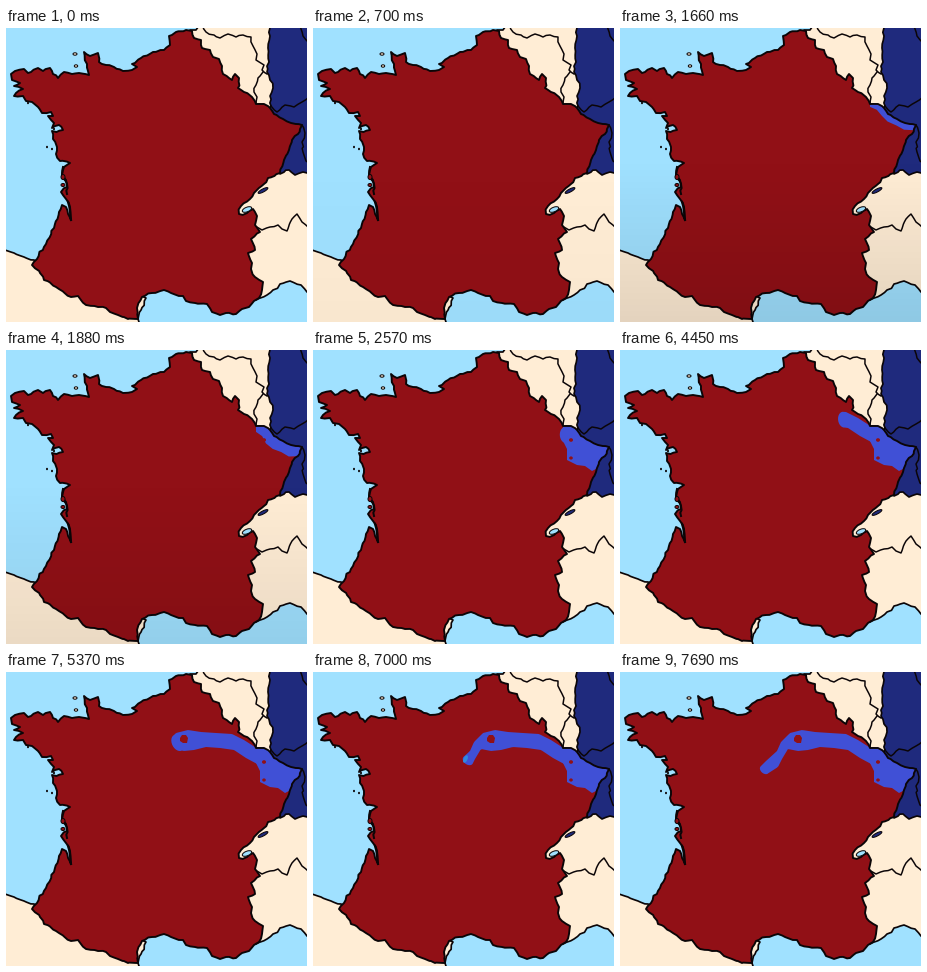
A matplotlib script for the animation above (8 s loop, 301x294 px).

```python
import numpy as np
import matplotlib.pyplot as plt
from matplotlib.animation import FuncAnimation
from matplotlib.patches import Polygon, Ellipse

W, H, DPI = 301, 294, 128
PX = 72 / DPI
STEP = 40
FRAMES = 200

SEA, LAND, RED = "#a0e1ff", "#ffedd5", "#911016"
NAVY, BLUE, INK = "#1f2a7d", "#4050d6", "#0b0507"

rng = np.random.default_rng(4)


def pts(text):
    return np.array([p.split(",") for p in text.split()], float)


def rough(p, amp=0.55, gap=3.2, closed=False):
    """Break a polyline into short, slightly irregular pieces."""
    p = np.vstack([p, p[:1]]) if closed else p
    out = []
    for a, b in zip(p[:-1], p[1:]):
        n = max(1, int(np.hypot(*(b - a)) / gap))
        seg = a + (b - a) * np.arange(n)[:, None] / n
        seg[1:] += rng.normal(0, amp, (n - 1, 2))
        out.append(seg)
    return np.vstack(out + [p[-1:]])


fig = plt.figure(figsize=(W / DPI, H / DPI), dpi=DPI, facecolor=SEA)
ax = fig.add_axes([0, 0, 1, 1])
ax.set_xlim(0, W)
ax.set_ylim(H, 0)
ax.axis("off")


def area(p, color, z, edge=INK, lw=1.7):
    patch = Polygon(p, closed=True, fc=color, ec=edge, lw=lw * PX,
                    zorder=z, joinstyle="round")
    ax.add_patch(patch)
    return patch


def line(text, lw=1.5, z=3, amp=0.55):
    p = rough(pts(text), amp)
    ax.plot(p[:, 0], p[:, 1], color=INK, lw=lw * PX, zorder=z,
            solid_joinstyle="round")


def dot(x, y, w, h, color, z, edge="none", angle=0):
    e = Ellipse((x, y), w, h, angle=angle, fc=color, ec=edge, lw=PX, zorder=z)
    ax.add_patch(e)
    return e


# neighbouring lands
spain = pts("-4,221 8,225 18,229 28,232 60,250 140,270 132,291 134,298 -4,298")
low = pts("184,2 190,2 196,-4 268,-4 270,84 240,80 200,40")
east = pts("240,150 270,140 306,140 306,268 301,264 295,257 284,253 274,256 "
           "267,262 261,267 250,272 225,260 225,175")
germany = pts("263,-4 264,8 262,20 263,34 261,44 264,52 267,60 264,68 265,78 "
              "262,90 270,120 274,146 283,142 289,147 297,144 306,147 306,-4")
for shape, color in ((spain, LAND), (low, LAND), (east, LAND), (germany, NAVY)):
    area(rough(shape, closed=True), color, 2)

line("197,-2 200,4 208,7 214,10 222,6 230,9 237,7 245,9 247,18 251,26 "
     "250,32 258,37 256,42 261,46")
line("257,44 252,50 250,57 248,64 251,69 250,76")
line("265,78 271,84 279,77 288,79 296,74 303,69")
line("294,-2 297,8 303,15")
line("296,97 299,105 296,114 297,124 300,133 303,135")
line("249,198 256,202 264,199 272,197 276,201 281,203 286,191 291,186 "
     "296,194 303,200")

# the large country
france = rough(pts(
    "5,46 9,43 18,41 22,45 32,40 37,43 44,40 47,46 52,50 58,44 66,46 73,45 "
    "83,47 81,36 78,24 84,28 92,25 93,34 100,37 108,39 117,43 126,42 131,39 "
    "126,36 135,30 147,24 158,22 164,17 163,8 170,4 180,2 186,3 188,10 "
    "195,12 196,20 204,22 207,29 213,31 216,38 217,46 226,52 229,46 233,50 "
    "232,60 238,64 246,69 250,76 258,76 264,80 268,86 277,91 285,95 296,97 "
    "292,106 286,112 283,122 278,132 274,145 262,150 258,156 248,165 244,171 "
    "235,178 233,186 241,185 247,181 251,188 249,197 254,204 245,211 249,222 "
    "242,225 246,235 245,241 249,249 257,254 256,262 253,270 248,273 243,279 "
    "236,281 230,286 220,285 214,287 206,284 201,276 189,275 180,273 177,268 "
    "165,265 158,262 146,265 136,269 131,280 132,291 122,291 112,287 104,284 "
    "100,280 92,279 80,277 72,268 65,269 50,259 38,252 34,245 26,237 31,231 "
    "40,216 48,200 53,184 56,177 60,179 65,192 64,179 60,171 55,164 61,159 "
    "60,152 56,147 58,139 64,135 54,133 50,126 51,119 47,111 46,103 57,102 "
    "53,97 46,100 48,95 42,88 47,88 45,84 36,85 32,79 26,74 20,73 17,68 "
    "8,68 10,65 17,61 8,58 14,55 6,52"), closed=True)
land = area(france, RED, 4, edge="none")
area(france, "none", 7, lw=1.9)

line("57,139 56,147 61,156 61,166", 2, 7)
line("62,174 64,183 65,192", 2.2, 7, 0.2)
dot(57, 149, 4, 5, RED, 7, INK)
dot(57, 157, 4, 3, RED, 7, INK)
for x, y in ((41, 119), (46, 121), (48, 101), (22, 75)):
    dot(x, y, 2, 2.4, INK, 7)
dot(69, 26, 4, 2.4, LAND, 3, INK)
dot(70, 38, 3.4, 2.4, LAND, 3, INK)
dot(257, 162.5, 11, 3, NAVY, 5, INK, -28)
dot(241, 181.5, 10, 4.5, SEA, 8, INK, -22)

# advancing force: border strip, then a band moving west
border = pts("250,74 258,75 265,79 269,85 278,90 286,94 298,96")
depth = pts("250,91 254,99 254,110 264,115 272,116 279,121 285,118")
upper = pts("252,77 238,68 226,62 210,61 195,60 182,58 170,61 161,70 157,79 "
            "146,89 138,97")
lower = pts("253,93 240,86 228,78 214,76 200,75 188,78 178,79 168,77 162,87 "
            "158,95 144,104")
mid = (upper + lower) / 2
arc = np.r_[0, np.cumsum(np.hypot(*np.diff(mid, axis=0).T))]

strip = area(border, BLUE, 5, edge="none")
band = area(upper, BLUE, 5, edge="none")
glow = dot(152.5, 87, 4, 8, "#2f8ae0", 5.5, angle=25)
for p in (strip, band, glow):
    p.set_clip_path(land)

# pockets still held
area(pts("174,66 176,63 180,63 182,66 181,71 177,71 174,69"), RED, 6, "none")
dot(258, 90, 4, 3.6, RED, 6)
dot(258, 108, 3.6, 3.2, RED, 6)
sparks = [dot(x, y, 3, 3, "#5c1c60", 6)
          for x, y in ((273, 66), (289, 62), (290, 68))]

shade = np.zeros((H, 1, 4))
shade[:, 0, 3] = np.clip((np.arange(H) - 130) / 164, 0, 1) * 0.11
veil = ax.imshow(shade, extent=(0, W, H, 0), aspect="auto", zorder=9)
ax.set_xlim(0, W)
ax.set_ylim(H, 0)

TICKS = np.r_[0, np.linspace(240, 5370, 23), np.linspace(5840, 7690, 9)]


def along(p, s):
    return np.c_[np.interp(s, arc, p[:, 0]), np.interp(s, arc, p[:, 1])]


def band_shape(s):
    k = np.linspace(0, s, 60)
    up, lo = along(upper, k), along(lower, k)
    c = (up[-1] + lo[-1]) / 2
    r = up[-1] - c
    ahead = np.array([r[1], -r[0]]) * 0.7
    a = np.linspace(0, np.pi, 14)[:, None]
    return np.vstack([up, c + r * np.cos(a) + ahead * np.sin(a), lo[::-1]])


def update(i):
    now = i * STEP + STEP / 2
    t = TICKS[TICKS <= now + 5].max()
    d = np.interp(t, [1250, 1660, 2570], [0, 0.3, 1])
    strip.set_visible(d > 0)
    strip.set_xy(np.vstack([border, (border + d * (depth - border))[::-1]]))
    s = np.interp(t, [2570, 3740, 4680, 5370, 5840, 7000, 7690],
                  [0, 27, 35, 85, 88, 111, 125])
    band.set_visible(s > 0)
    band.set_xy(band_shape(max(s, 0.1)))
    glow.set_visible(6900 < t < 7150)
    for p in sparks:
        p.set_visible(3400 < t < 4100)
    veil.set_alpha(float(np.interp(t, [240, 1190, 1660, 2500], [0, 1, 1, 0])))
    return strip, band, glow, veil, *sparks


anim = FuncAnimation(fig, update, frames=FRAMES, interval=STEP, repeat=True,
                     repeat_delay=0, init_func=lambda: update(0), blit=False)
plt.show()
```
